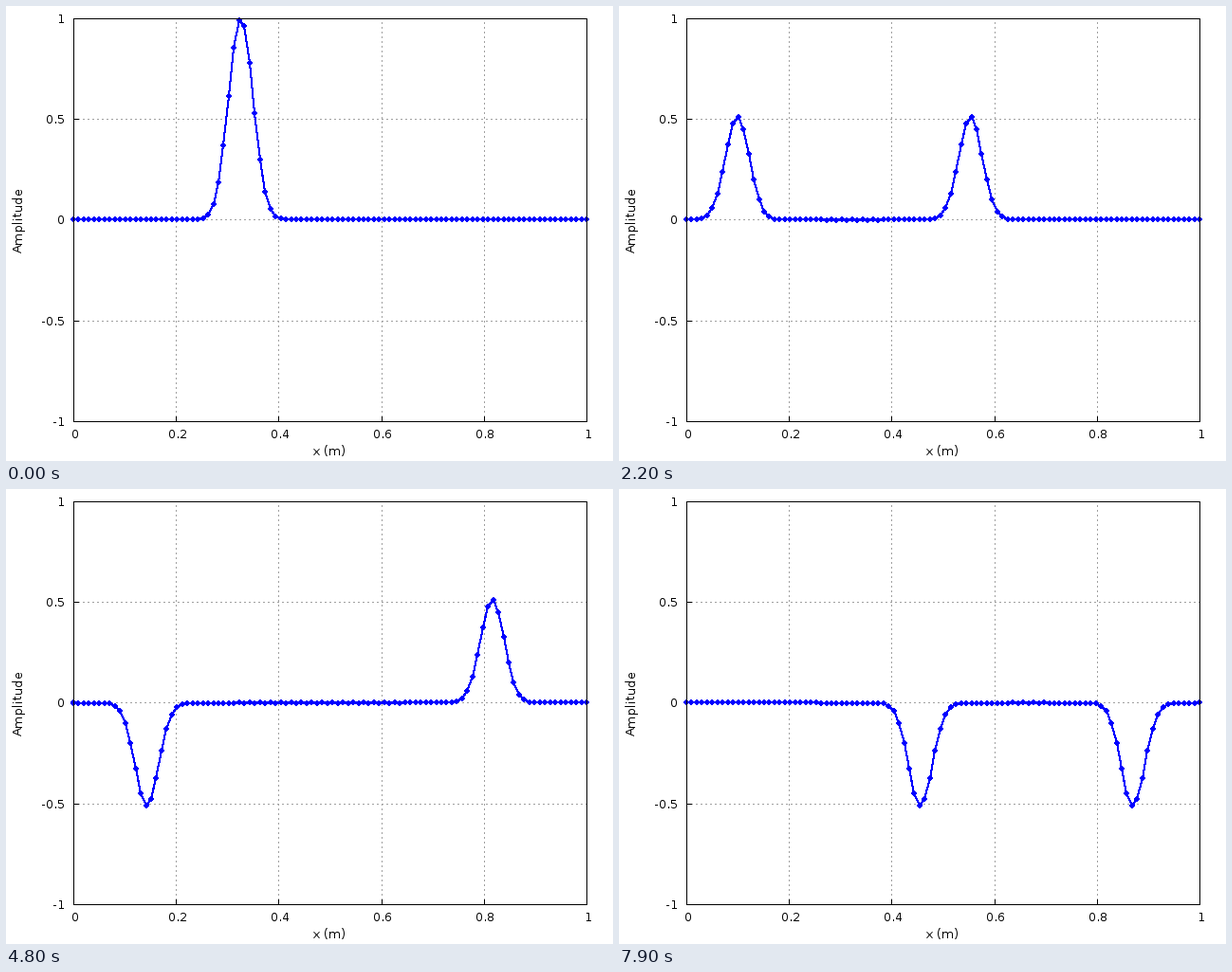
Animation of 640 by 480 pixels, one loop 8 s. Source, as a matplotlib script:

```python
import numpy as np
import matplotlib.pyplot as plt
from matplotlib.animation import FuncAnimation
from matplotlib.collections import PolyCollection

W, H, DPI = 640, 480, 80
PX = 72 / DPI                       # one pixel in points
LEFT, RIGHT, TOP, BOTTOM = 71, 612, 13, 438
FRAMES, INTERVAL = 80, 100
CELLS = 100
BLUE, GREY = "#0000ff", "#a0a0a0"

plt.rcParams.update({
    "font.family": "DejaVu Sans",
    "font.size": 12,
    "text.hinting": "native",
    "text.hinting_factor": 1,
})

fig = plt.figure(figsize=(W / DPI, H / DPI), dpi=DPI, facecolor="white")
ax = fig.add_axes([0, 0, 1, 1])
ax.set_xlim(0, W)
ax.set_ylim(H, 0)
ax.axis("off")


def col(x):
    return np.floor(LEFT + (RIGHT - LEFT) * x + 0.5)


def row(v):
    # halves round upwards on screen, so tiny negatives fall one pixel lower
    half = (BOTTOM - TOP) / 2
    return np.ceil(TOP + half - 0.5 - half * v)


def hline(y, x0, x1, color="black", z=2, style="-"):
    ax.plot([x0, x1 + 1], [y + 0.5] * 2, color=color, lw=PX, ls=style,
            zorder=z, snap=False, solid_capstyle="butt", dash_capstyle="butt")


def vline(x, y0, y1, color="black", z=2, style="-"):
    ax.plot([x + 0.5] * 2, [y1 + 1, y0], color=color, lw=PX, ls=style,
            zorder=z, snap=False, solid_capstyle="butt", dash_capstyle="butt")


def draw_scale():
    dots = (0, (2, 3))
    for v in (0, 0.2, 0.4, 0.6, 0.8, 1):
        x = col(v)
        if 0 < v < 1:
            vline(x, TOP, BOTTOM, GREY, 1, dots)
            vline(x, BOTTOM - 5, BOTTOM)
        ax.text(x + 1.5, 456, f"{v:g}", ha="center", va="baseline")
    for v in (-1, -0.5, 0, 0.5, 1):
        y = row(v)
        if -1 < v < 1:
            hline(y, LEFT, RIGHT, GREY, 1, dots)
            hline(y, LEFT, LEFT + 5)
        ax.text(62, y + 5, f"{v:g}", ha="right", va="baseline")
    for x in (LEFT, RIGHT):
        vline(x, TOP, BOTTOM, z=6)
    for y in (TOP, BOTTOM):
        hline(y, LEFT, RIGHT, z=6)


def advance(ch):
    probe = ax.text(0, 0, ch * 2)
    double = probe.get_window_extent().width
    probe.set_text(ch)
    single = probe.get_window_extent().width
    probe.remove()
    return double - single


def upright_label(word, x, middle, tracking=0.5):
    steps = [advance(ch) + tracking for ch in word]
    y = middle + sum(steps) / 2
    for ch, step in zip(word, steps):
        ax.text(x, round(y), ch, rotation=90, rotation_mode="anchor",
                ha="left", va="baseline")
        y -= step


def wave_history():
    """Leapfrog wave equation at Courant number 1 with fixed ends."""
    u = np.exp(-900 * (np.arange(CELLS + 1) / CELLS - 1 / 3) ** 2)
    u[0] = u[-1] = 0
    prev = u.copy()
    states = []
    for _ in range(FRAMES):
        states.append(u)
        new = np.zeros_like(u)
        new[1:-1] = u[2:] + u[:-2] - prev[1:-1]
        prev, u = u, new
    return states


draw_scale()
ax.text(340.5, 474, "x (m)", ha="center", va="baseline")
upright_label("Amplitude", 17, 225.5)

states = wave_history()
xs = col(np.maximum(np.arange(CELLS + 1) - 1, 0) / (CELLS - 1))
diamond = 2.6 * np.array([[1, 0], [0, 1], [-1, 0], [0, -1]])

# without antialiasing every touched pixel is filled: this stroke spans two
line, = ax.plot([], [], color=BLUE, lw=PX, antialiased=False, snap=False,
                solid_joinstyle="round", solid_capstyle="butt", zorder=4)
marks = PolyCollection([], facecolors=BLUE, edgecolors="none", linewidths=0,
                       antialiaseds=False, snap=False, zorder=5)
ax.add_collection(marks, autolim=False)


def update(i):
    points = np.column_stack([xs, row(states[i])])
    line.set_data(points.T)
    marks.set_verts(points[:, None, :] + diamond)
    return line, marks


anim = FuncAnimation(fig, update, frames=FRAMES, interval=INTERVAL,
                     repeat=True, repeat_delay=0, blit=False)
plt.show()
```
